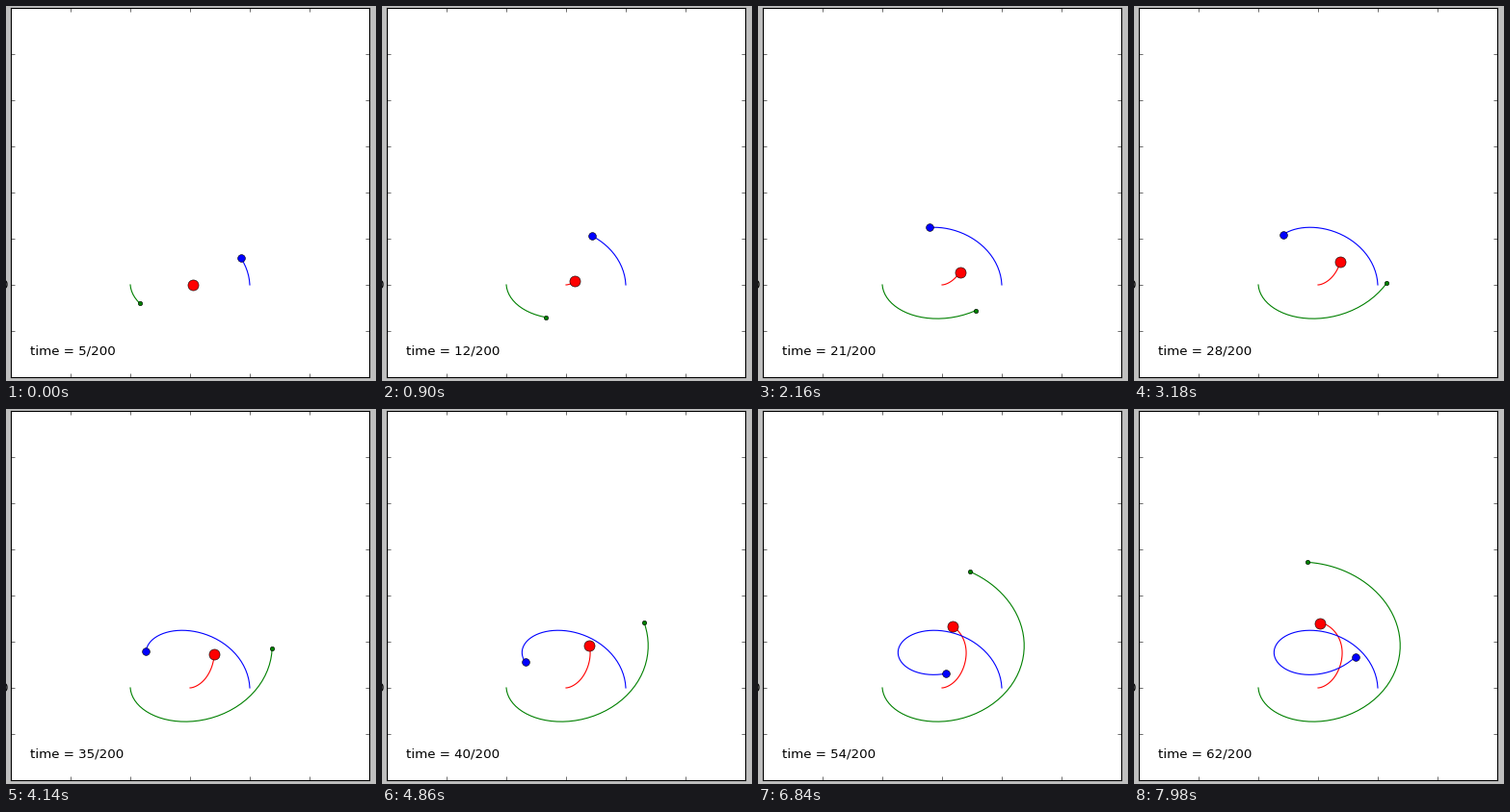
These frames come from a looping animation (384x390 px, 8000 ms). A matplotlib script:

```python
import numpy as np
import matplotlib.pyplot as plt
from matplotlib.animation import FuncAnimation

W, H, DPI = 384, 390, 80
TICK_MS, LOOP_MS = 20, 8000
FIRST, LAST = 5, 62
ORIGIN = np.array([191, 290])      # stage pixel of data point (0, 0)
SCALE = np.array([62, -48])        # pixels per data unit

# three bodies (red, blue, green) start on a line
START = np.array([(0, 0), (1, 0), (-1, 0)], float)

# stage positions the bodies pass through at some steps
KEY_STEPS = [13, 22, 36, 46, 55, 63]
KEY_POSES = np.array([
    [(200.2, 286.1), (218.3, 239.3), (169.9, 323.3)],
    [(209.1, 277.0), (178.3, 230.1), (226.0, 316.9)],
    [(216.2, 255.1), (145.3, 252.1), (276.0, 248.6)],
    [(212.3, 238.0), (159.4, 272.0), (258.9, 197.6)],
    [(202.3, 226.0), (195.3, 275.0), (219.9, 168.6)],
    [(193.4, 223.0), (229.4, 258.1), (179.9, 159.4)]])


def simulate(params):
    """Newtonian orbits; params: gravity, two masses, three start velocities."""
    gravity, mass = params[0], np.array([1, *params[1:3]])
    pos, vel = START, params[3:].reshape(3, 2)
    path = [pos]
    for _ in range(LAST + 1):
        gap = pos[None] - pos[:, None]
        dist = np.hypot(gap[..., 0], gap[..., 1]) + np.eye(3)
        pull = mass[None, :, None] * gap / dist[..., None] ** 3
        vel = vel + gravity * pull.sum(axis=1)
        pos = pos + vel
        path.append(pos)
    return np.array(path)


def miss(params):
    poses = ORIGIN + SCALE * simulate(params)[KEY_STEPS]
    return (poses - KEY_POSES).ravel()


def tune(params, rounds=25, eps=1e-6):
    """Gauss-Newton with half steps towards the key poses."""
    for _ in range(rounds):
        error = miss(params)
        slopes = [(miss(params + eps * unit) - error) / eps
                  for unit in np.eye(len(params))]
        params = params - 0.5 * np.linalg.lstsq(np.array(slopes).T, error, rcond=None)[0]
    return params


guess = np.array([0.0065, 0.46, 0.165, 0, 0, 0, 0.1, 0, -0.072])
path = simulate(tune(guess))

# the counter advances evenly, rounded to a 60 ms grid
k = np.arange(LAST - FIRST)
starts = 60 + 60 * np.round(2.356 * k + 0.02)

plt.rcParams["font.family"] = "DejaVu Sans"
plt.rcParams["text.kerning_factor"] = 6
fig = plt.figure(figsize=(W / DPI, H / DPI), dpi=DPI, facecolor="0.75")
ax = fig.add_axes([5 / W, 4 / H, 372 / W, 384 / H])
ax.set(xlim=(-3, 3), ylim=(-2, 6), xticks=range(-3, 4), yticks=range(-2, 7))
ax.tick_params(direction="in", length=4, width=0.5, top=True, right=True,
               labelbottom=False, labelleft=False)
for spine in ax.spines.values():
    spine.set_linewidth(1)

fig.text(2 / W, 100 / H, "0", size=12, ha="right", va="center")
label = ax.text(0.054, 0.06, "", size=12, transform=ax.transAxes)

bodies = []
for color, size in (("#ff0000", 10), ("#0000ff", 7), ("#008000", 4)):
    trail, = ax.plot([], [], color=color, lw=1, zorder=2)
    dot, = ax.plot([], [], "o", color=color, ms=size, mec="black", mew=0.5, zorder=3)
    bodies.append((trail, dot))


def draw(i):
    n = FIRST + int(np.searchsorted(starts, i * TICK_MS, "right"))
    now = n + 1
    for (trail, dot), track in zip(bodies, path.swapaxes(0, 1)):
        trail.set_data(*track[:now + 1].T)
        dot.set_data(*track[now:now + 1].T)
    label.set_text(f"time = {n}/200")
    return [label]


anim = FuncAnimation(fig, draw, frames=LOOP_MS // TICK_MS, interval=TICK_MS,
                     repeat=True, repeat_delay=0, blit=False)
plt.show()
```
